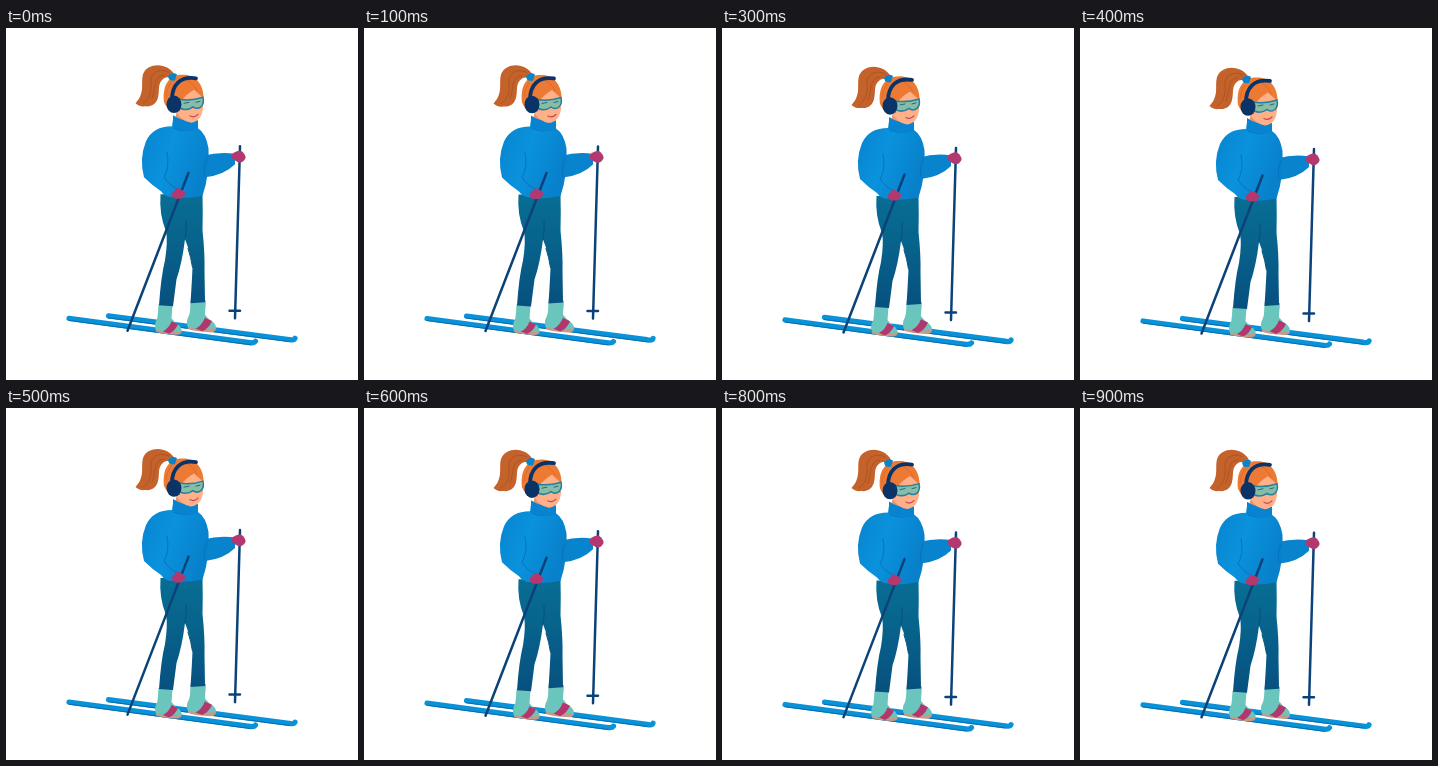
Animation of 352 by 352 pixels, one loop 1000 ms. Source, as an HTML page:

```html
<!DOCTYPE html>
<html>
<head>
<meta charset="utf-8">
<style>
  html, body { margin: 0; width: 100%; height: 100%; overflow: hidden; background: #fff; }
  svg { display: block; width: 100vw; height: 100vh; }
  .line { fill: none; stroke-linecap: round; stroke-linejoin: round; }
</style>
</head>
<body>
<svg viewBox="0 0 352 352">
  <defs>
    <linearGradient id="coat" x1="0" x2="1" y1="0" y2=".4">
      <stop offset="0" stop-color="#0883ce"/>
      <stop offset=".5" stop-color="#0a92dc"/>
      <stop offset="1" stop-color="#0881cc"/>
    </linearGradient>
    <linearGradient id="legs" x1="0" x2="0" y1="0" y2="1">
      <stop offset="0" stop-color="#086d94"/>
      <stop offset=".4" stop-color="#07648c"/>
      <stop offset="1" stop-color="#07507f"/>
    </linearGradient>
    <g id="boot">
      <path d="M152.500 276L166.500 277L165.500 290Q169 295 173 297Q177 301 175 304L151 303Q148 300 149.500 294Q152 290 152 284Z" fill="#6ac5bc"/>
      <path d="M150 301.500Q162 305 175.500 302.500Q176 306 171 306.500Q157 306 150 303.500Z" fill="#c79a85"/>
      <path d="M157 303Q163 300 165.500 293L172 296Q169 303 163 305.500Z" fill="#b3366c"/>
    </g>
  </defs>

  <g id="tail">
    <path d="M169 47C164 37 151 34.500 143 39C134 44 137 53 136 61C135 68 133 71 129.500 75C133 78 136 78.500 139 78C147 79 151 74 152 69C154 62 151 55 158 50C161 48 165 49 168 51Z" fill="#c4622c"/>
    <path class="line" d="M163 44C153 39 144 45 145 54C146 64 143 72 137 75M158 47C147 47 150 61 146 70" stroke="#b0541f"/>
  </g>

  <g id="skier">
    <g class="line" stroke="#0a92d8" stroke-width="5.200">
      <path d="M102.500 287.500L283 311.200Q288 312.500 289 310"/>
      <path d="M63 290L244 314.300Q248 315 249.500 313"/>
    </g>
    <g class="line" stroke="#086cae" stroke-width="1">
      <path d="M102 289.600L283 313.300M63 292.100L244 316.400"/>
    </g>

    <use href="#boot" transform="translate(18.500 -30) scale(1.090)"/>
    <use href="#boot"/>

    <path d="M154.500 166L196.500 166Q197 184 196.500 202Q199 226 198.500 243L199 274L184.500 275Q186 252 186.500 239Q184 223 179 211Q176 235 170.500 251L167 278L153 277Q155 248 159 232Q162 213 160 203Q153 186 154.500 166Z" fill="url(#legs)"/>
    <path class="line" d="M179 211Q181 202 180 193M186.500 239Q185 229 182 220" stroke="#075078"/>

    <path d="M197 127.500Q214 123 229 125.500L229 136Q218 147 199 149Z" fill="#0884ce"/>
    <path d="M167 91L191 91L192 100Q200 105 202.500 120Q204 146 196.500 167.500Q179 171 167 169Q159 169 155 163Q146 157 138 149Q133 130 140 113Q147 98 166 98Z" fill="url(#coat)"/>
    <path class="line" d="M161 124Q164 139 158 149Q163 157 172 161M201 129Q197 140 199 148M168 100Q179 105 191 100" stroke="#0773bb"/>

    <path d="M171 82L190 84L190 93Q180 98 169 92Z" fill="#eb946b"/>
    <path d="M167 87Q179 95 192 92L192 101Q179 105 167 99Z" fill="#0883cf"/>
    <path d="M170 63L192 58Q198 68 197 80Q195.500 93 185 94.500Q175 93 170 83Z" fill="#ffb088"/>
    <path d="M158 74C156 57 163 46.500 176 46.500C189 45.500 198 56 197.500 70Q194 67 188 61.500Q180 66 175 73L174 83Q163 86 158 74Z" fill="#ec7a34"/>
    <path class="line" d="M177 50Q187 53 191 62M165 54Q160 61 160 68" stroke="#e06a26"/>
    <path d="M162 48Q166 43 171 46L169 52Q165 53 163 51Z" fill="#0884cb"/>

    <path d="M173 71Q185 73 197 69Q198.500 75 195 78.500Q191 81.500 187 78.500Q181 83 174 80Z" fill="#85bda9" stroke="#267f9c" stroke-width="1.500"/>
    <path class="line" d="M178 75L183 74M190 74L194 73" stroke="#286b78"/>
    <path class="line" d="M184 87.500Q188 90 192 86" stroke="#c2464f" stroke-width="1.200"/>
    <path class="line" d="M166 71C166 57 174 47.500 190 50" stroke="#0a3468" stroke-width="3.800"/>
    <ellipse cx="168" cy="76" rx="7.500" ry="8.700" fill="#0a3468"/>

    <g class="line" stroke="#0b4379" stroke-width="2.500">
      <path d="M182.500 144.500L121.500 302.500"/>
      <path d="M234 118L229 290M223.500 282.500L234 282.500"/>
    </g>
    <path d="M166 165Q169 162 171 159.500Q175 160 179 164Q179 170 174 170.500Q168 171 166 168Z" fill="#b3386f"/>
    <path d="M226 126Q230 122 235 122.500Q240 126 239.500 130Q237 135 232 134Q228 132 226 130Z" fill="#b3386f"/>
  </g>
</svg>
<script>
  const skier = document.getElementById('skier');
  const tail = document.getElementById('tail');
  const shift = (el, y) => el.setAttribute('transform', `translate(0 ${y})`);

  // The body sinks in 100 ms steps; the ponytail settles first.
  function draw(now) {
    const step = Math.floor(now % 1000 / 100);
    const drop = 0.3 + 6.5 * (1 - Math.cos(Math.PI * step / 9)) / 2;
    shift(skier, drop);
    shift(tail, Math.min(drop, 5));
    requestAnimationFrame(draw);
  }
  draw(performance.now());
</script>
</body>
</html>
```
